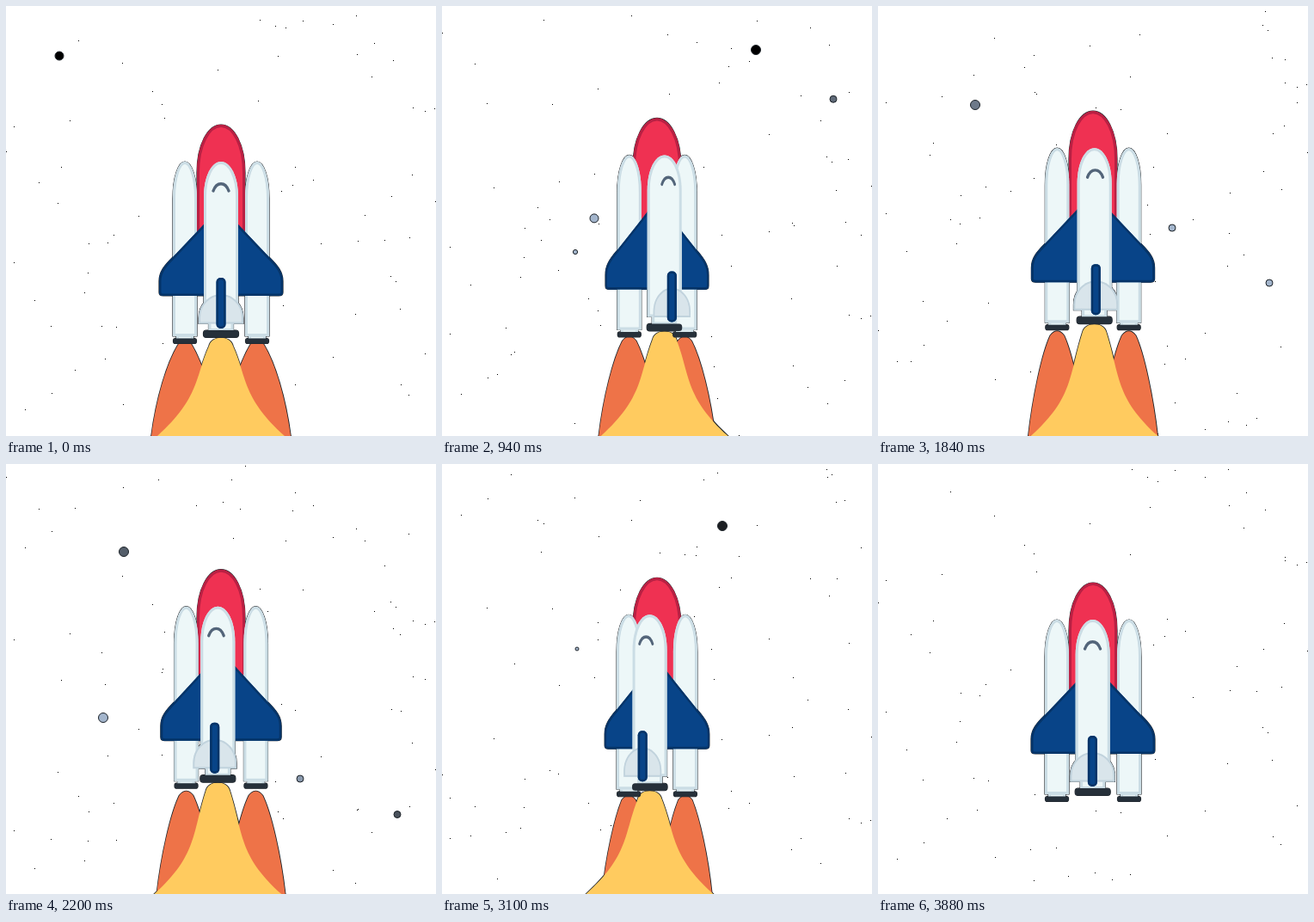
An HTML page with a canvas that plays this animation: 500x500 px, repeating every 3.9 s.

```html
<!DOCTYPE html>
<html>
<head>
<meta charset="utf-8">
<style>
html, body { margin: 0; width: 100%; height: 100%; overflow: hidden; background: #fff; }
canvas { display: block; width: 500px; height: 500px; }
</style>
</head>
<body>
<canvas id="stage" width="500" height="500"></canvas>
<script>
const ctx = document.getElementById('stage').getContext('2d');
const LOOP = 3900, STEP = 20, END = 3870;
const EDGE = '#1c2228';

// Paths are drawn around x = 0, with y in stage units at rest.
const bullet = (half, top, shoulder, bottom) => new Path2D(
  `M${-half} ${bottom}V${shoulder}C${-half} ${top + (shoulder - top) * 0.42} ${-half * 0.55} ${top} 0 ${top}` +
  `C${half * 0.55} ${top} ${half} ${top + (shoulder - top) * 0.42} ${half} ${shoulder}V${bottom}Z`);

const pill = (half, top, height, r) => {
  const p = new Path2D();
  p.roundRect(-half, top, half * 2, height, r);
  return p;
};

const shapes = {
  tank: bullet(28, 138, 194, 330),
  booster: bullet(14, 181, 224, 384),
  boosterNeck: pill(10, 382, 7, 0),
  boosterBar: pill(13.5, 386.5, 6, 2.5),
  wing: new Path2D('M0 232L-20 254L-56 292C-66 302 -72 309 -72 320V333Q-72 337 -67 337' +
    'H67Q72 337 72 333V320C72 309 66 302 56 292L20 254Z'),
  body: bullet(20, 181, 222, 369),
  neck: pill(14.5, 366, 12, 0),
  bar: pill(20.5, 377, 8.5, 3.5),
  tail: new Path2D('M-26 369.5V363C-26 346 -13 335 0 335C13 335 26 346 26 363V369.5Z'),
  fin: pill(5.5, 316, 59, 5),
  mark: new Path2D('M-9 215C-5 204 5 204 9 215')
};

const white = ['#edf7f8', '#cbdde5', 3];
const steel = ['#26303a', '#26303a', 0];
const navy = ['#084488', '#053468', 2.5];

// Falling lights: x, radius, a time, the height at that time, speed in px/ms
const lights = [
  [62, 5, 0, 58, 0.527], [177, 5, 600, 151, 0.282], [155, 2.6, 600, 133, 0.45],
  [235, 5, 1280, 63, 0.66], [365, 5.5, 1280, 204, 0.45], [455, 4, 1280, 189, 0.2375],
  [113, 5.5, 1840, 115, 0.5], [342, 4, 1840, 258, 0.3], [216, 5, 2540, 69, 0.66],
  [137, 5.5, 2540, 238, 0.4], [326, 5.5, 3100, 72, 0.5], [157, 2, 3100, 215, 0.35]
];

let seed = 71;
const random = () => (seed = seed * 16807 % 2147483647) / 2147483647;
const dust = Array.from({ length: 85 }, () => ({
  x: Math.floor(random() * 500),
  y: random() * 500,
  laps: 2 + Math.floor(random() * 3)
}));

const times = [0, 600, 1280, 1840, 2540, 3100, 3900];
const sideTops = [389, 392, 392, 394, 397.5, 391.5, 389];
const sideSpread = [39, 34, 37, 33.5, 35, 31, 39];

function tween(values, t) {
  let i = 0;
  while (i < times.length - 2 && t >= times[i + 1]) i++;
  const k = (t - times[i]) / (times[i + 1] - times[i]);
  const e = (1 - Math.cos(Math.PI * k)) / 2;
  return values[i] + (values[i + 1] - values[i]) * e;
}

function drawDust(t) {
  ctx.fillStyle = '#000';
  for (const d of dust) {
    ctx.fillRect(d.x, Math.floor((d.y + 500 * d.laps * t / LOOP) % 500), 1, 1);
  }
}

function drawLights(t) {
  for (const [x, r, t0, y0, v] of lights) {
    const y = y0 + (t - t0) * v;
    if (y < 45 || y > 430) continue;
    const k = Math.max(0, Math.min(1, (y - 58) / 85, (455 - y) / 105));
    ctx.beginPath();
    ctx.arc(x, y, r, 0, Math.PI * 2);
    ctx.fillStyle = `rgb(${163 * k},${181 * k},${204 * k})`;
    ctx.fill();
    ctx.strokeStyle = EDGE;
    ctx.lineWidth = 1;
    ctx.stroke();
  }
}

function sideFlame(x, top, w) {
  return new Path2D(`M${x - w - 2} 512L${x - w} 500C${x - w * 0.85} 455 ${x - w * 0.53} ${top + 26} ${x - 8} ${top + 5}` +
    `Q${x} ${top - 5} ${x + 8} ${top + 5}C${x + w * 0.53} ${top + 26} ${x + w * 0.85} 455 ${x + w} 500L${x + w + 2} 512Z`);
}

function mainFlame(x, top) {
  return new Path2D(`M${x - 88} 512L${x - 74} 500C${x - 24} 455 ${x - 30} 430 ${x - 14} ${top + 10}` +
    `C${x - 11} ${top - 3} ${x + 11} ${top - 3} ${x + 14} ${top + 10}` +
    `C${x + 30} 430 ${x + 24} 455 ${x + 74} 500L${x + 88} 512Z`);
}

function drawFlames(t, rise, offset, shift) {
  const top = tween(sideTops, t) - rise, w = tween(sideSpread, t);
  const flames = [
    [sideFlame(250 - offset, top, w), '#ee7348'],
    [sideFlame(250 + offset, top, w), '#ee7348'],
    [mainFlame(250 + shift, 385.5 - rise), '#ffcb5f']
  ];
  ctx.strokeStyle = EDGE;
  ctx.lineWidth = 1.6;
  for (const [path] of flames) ctx.stroke(path);
  for (const [path, color] of flames) {
    ctx.fillStyle = color;
    ctx.fill(path);
  }
}

function place(x, rise, scale, paint) {
  ctx.save();
  ctx.translate(x, -rise);
  ctx.scale(scale, 1);
  paint();
  ctx.restore();
}

function drawRocket(rise, turn, offset, squeeze) {
  const sin = Math.sin(turn);
  const shift = 13.6 * sin;
  const parts = [[shapes.tank, 250, 1, ['#ef3152', '#b92043', 3]]];
  for (const x of [250 - offset, 250 + offset]) {
    parts.push([shapes.boosterNeck, x, 1, white], [shapes.booster, x, 1, white],
      [shapes.boosterBar, x, 1, steel]);
  }
  parts.push(
    [shapes.wing, 250, squeeze, navy],
    [shapes.neck, 250 + shift, 1, white],
    [shapes.body, 250 + shift, 1, white],
    [shapes.tail, 250 + 27 * sin, squeeze, ['#d9e5eb', '#c1d3dd', 2]],
    [shapes.bar, 250 + shift, 1, steel],
    [shapes.fin, 250 + 27 * sin, 1, navy]);

  // Thin dark rim around the whole craft
  for (const [path, x, scale] of parts) {
    place(x, rise, scale, () => {
      ctx.strokeStyle = EDGE;
      ctx.lineWidth = 1.2;
      ctx.stroke(path);
    });
  }
  for (const [path, x, scale, [fill, line, width]] of parts) {
    place(x, rise, scale, () => {
      ctx.fillStyle = fill;
      ctx.fill(path);
      if (!width) return;
      ctx.clip(path);
      ctx.strokeStyle = line;
      ctx.lineWidth = width * 2;
      ctx.stroke(path);
    });
  }
  place(250 + 20.5 * sin, rise, squeeze, () => {
    ctx.strokeStyle = '#53657a';
    ctx.lineWidth = 3.4;
    ctx.lineCap = 'round';
    ctx.stroke(shapes.mark);
  });
}

function draw(t) {
  const phase = t / LOOP * Math.PI * 2;
  const rise = 8 * (1 - Math.cos(phase));
  const sway = Math.sin(phase);
  const turn = sway * Math.PI * 40 / 180;
  const offset = 42 * Math.cos(turn);
  const squeeze = 1 - sway * sway / 6;

  ctx.fillStyle = '#fff';
  ctx.fillRect(0, 0, 500, 500);
  drawDust(t);
  if (t < END) {
    drawLights(t);
    drawFlames(t, rise, offset, 13.6 * Math.sin(turn));
  }
  drawRocket(rise, turn, offset, squeeze);
}

const start = performance.now();
function tick() {
  const t = (performance.now() - start) % LOOP;
  draw(Math.floor(t / STEP) * STEP);
  requestAnimationFrame(tick);
}
tick();
</script>
</body>
</html>
```
